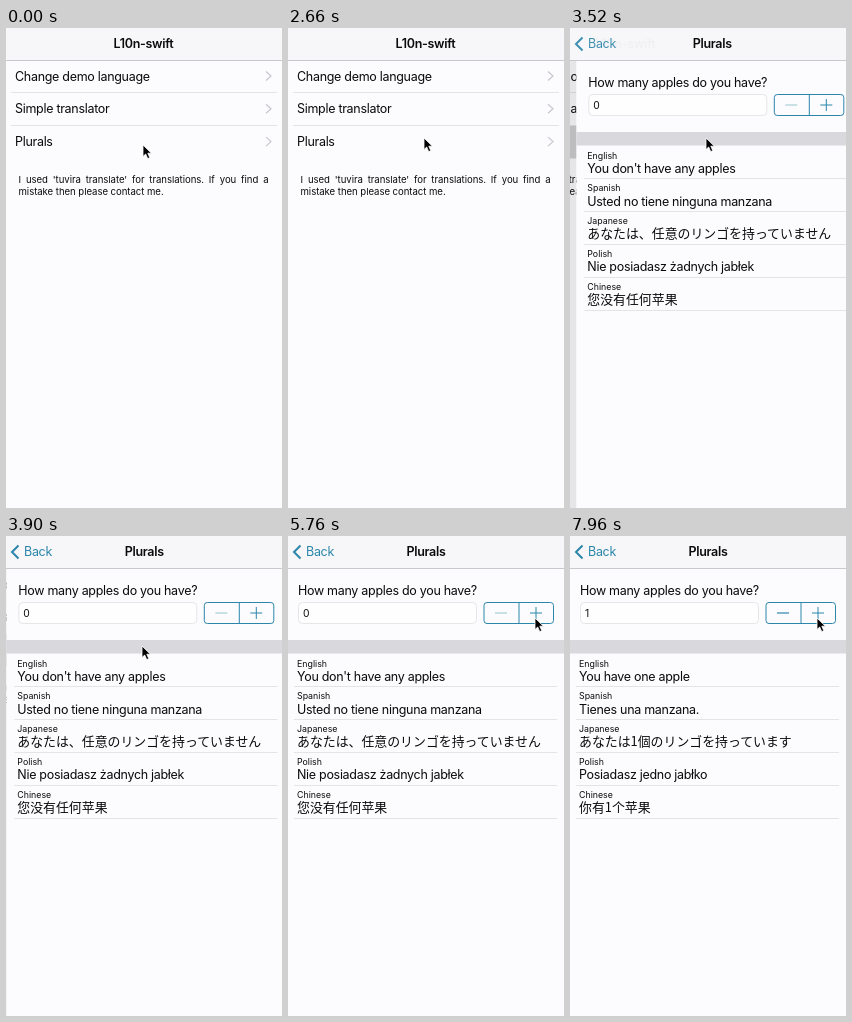
Recreate the animation shown at these times as an HTML page. Size 276 by 480 pixels, loop 8000 ms.

```html
<!DOCTYPE html>
<html lang="en">
<head>
<meta charset="utf-8">
<title>L10n-swift</title>
<style>
  html, body { margin: 0; width: 100%; height: 100%; overflow: hidden; background: #fcfcff; }
  svg { display: block; width: 276px; height: 480px; }
  text { font: 12.5px Inter, sans-serif; letter-spacing: -.3px; fill: #0b0b0b; white-space: pre; }
  .title { font-weight: 600; }
  .small { font-size: 8.8px; letter-spacing: 0; }
  .cjk { font-size: 12.9px; letter-spacing: 0; }
  .ja { font-family: "Noto Sans CJK JP", "Noto Sans CJK", sans-serif; }
  .zh { font-family: "Noto Sans CJK SC", "Noto Sans CJK", sans-serif; }
  .line { stroke: #e4e4e6; }
  .arrow { fill: none; stroke: #c7c7cc; stroke-width: 1.2; }
  .tint { fill: none; stroke: #2b86aa; }
  .note { font: 9.6px/12px Inter, sans-serif; letter-spacing: -.05px; color: #0b0b0b; }
  .note div { white-space: nowrap; }
  .note .full { white-space: normal; text-align-last: justify; }
</style>
</head>
<body>
<svg viewBox="0 0 276 480">
  <rect width="276" height="480" fill="#fcfcff"/>

  <g id="menu">
    <rect id="selected" y="97.5" width="276" height="33" fill="#cfcfd2"/>
    <g id="menuRows"></g>
    <foreignObject x="12.5" y="145.5" width="250" height="30">
      <div xmlns="http://www.w3.org/1999/xhtml" class="note">
        <div class="full">I used 'tuvira translate' for translations. If you find a</div>
        <div>mistake then please contact me.</div>
      </div>
    </foreignObject>
  </g>
  <rect id="dim" width="276" height="480"/>

  <g id="page">
    <rect width="276" height="480" fill="#fcfcff"/>
    <rect y="104" width="276" height="13.5" fill="#d9d9dd"/>
    <g id="content">
      <text x="10" y="59.2">How many apples do you have?</text>
      <rect x="10.5" y="66.5" width="178" height="21" rx="4" fill="#fefeff" stroke="#e6e6e8"/>
      <text id="count" x="15" y="80.8" style="font-size:10.3px;letter-spacing:0">0</text>
      <path id="plusFill" d="M231 66.5h31.5a3 3 0 0 1 3 3v15a3 3 0 0 1-3 3H231z" fill="#cde6ee"/>
      <rect class="tint" x="196" y="66.5" width="69.5" height="21" rx="3"/>
      <path class="tint" d="M231 66.5v21M242 77h12M248 71v12"/>
      <path id="minus" d="M207 77h12" stroke-width="1.2"/>
      <g id="phrases"></g>
    </g>
  </g>

  <rect width="276" height="32" fill="#f7f7f9"/>
  <path d="M0 32.5h276" stroke="#c9c9cd"/>
  <text id="menuTitle" class="title" x="107.5" y="20.3">L10n-swift</text>
  <text id="pageTitle" class="title" x="138" y="20.3" text-anchor="middle">Plurals</text>
  <g id="back">
    <path class="tint" d="M12.5 9.5L6 16l6.5 6.5" stroke-width="2"/>
    <text x="18" y="20.3" style="fill:#2b86aa">Back</text>
  </g>

  <g id="cursor">
    <circle id="ring" cx="1" r="16" fill="#fff" fill-opacity=".3" stroke="#111" stroke-width="1.5"/>
    <path d="M0 0v11.5l2.7-2.5 2 4.6 2.1-.9-2-4.5h3.6z" fill="#000" stroke="#fff" stroke-width=".8"/>
  </g>
</svg>
<script>
const $ = id => document.getElementById(id);
const LOOP = 8000, ROW = 32.8;
const PRESS_ROW = 2720, PUSH = 2890, SETTLE = 4250, PRESS_PLUS = 6900, RELEASE_PLUS = 7120;

const phrases = [
  ['English', '', "You don't have any apples", 'You have one apple'],
  ['Spanish', '', 'Usted no tiene ninguna manzana', 'Tienes una manzana.'],
  ['Japanese', 'cjk ja', 'あなたは、任意のリンゴを持っていません', 'あなたは1個のリンゴを持っています'],
  ['Polish', '', 'Nie posiadasz żadnych jabłek', 'Posiadasz jedno jabłko'],
  ['Chinese', 'cjk zh', '您没有任何苹果', '你有1个苹果'],
];

$('menuRows').innerHTML = ['Change demo language', 'Simple translator', 'Plurals'].map((label, i) => {
  const y = 48 + i * ROW;
  const line = i < 2 ? `<path class="line" d="M5 ${Math.round(y + 16) + .5}h266"/>` : '';
  return `<text x="9" y="${y + 4.5}">${label}</text>
    <path class="arrow" d="M260 ${y - 4.5}l5 4.5-5 4.5"/>${line}`;
}).join('');

$('phrases').innerHTML = phrases.map(([name, style], i) => {
  const y = 117.5 + i * ROW;
  return `<text class="small" x="9" y="${y + 13}">${name}</text>
    <text class="phrase ${style}" x="9" y="${y + 27.3}"></text>
    <path class="line" d="M6 ${Math.round(y + 32.8) + .5}h263"/>`;
}).join('');
const phraseNodes = document.querySelectorAll('.phrase');

const clamp = v => Math.min(1, Math.max(0, v));
const smooth = (t, from, to) => {
  const k = clamp((t - from) / (to - from));
  return k * k * (3 - 2 * k);
};
const move = (node, x, y = 0) => node.setAttribute('transform', `translate(${x} ${y})`);
const fade = (node, value) => node.setAttribute('opacity', value);
// Full while pressed, then a short fade
const press = (t, from, to) => t < from ? 0 : 1 - clamp((t - to) / 100);

let shownCount = -1;
function showCount(n) {
  if (n === shownCount) return;
  shownCount = n;
  $('count').textContent = n;
  phraseNodes.forEach((node, i) => node.textContent = phrases[i][2 + n]);
  $('minus').setAttribute('stroke', n ? '#2b86aa' : '#a8cfd2');
}

function draw(t) {
  // Critically damped spring for the page push
  const u = Math.max(0, t - PUSH) * .009;
  const rest = t >= SETTLE ? 0 : (1 + u) * Math.exp(-u);
  const done = 1 - rest;

  move($('menu'), -.3 * 276 * done);
  fade($('selected'), t >= PRESS_ROW + 40 ? 1 : 0);
  fade($('dim'), .09 * done);
  move($('page'), 276 * rest);
  move($('content'), t < SETTLE ? 2 : 0);

  move($('menuTitle'), -84 * done);
  fade($('menuTitle'), rest);
  move($('pageTitle'), 187 * rest);
  fade($('pageTitle'), clamp(done * 1.2));
  fade($('back'), clamp((done - .75) / .25));

  const settle = smooth(t, 200, 900), travel = smooth(t, 4450, 5200);
  move($('cursor'), 137 - settle + 111 * travel, 117 - 7 * settle - 28 * travel);
  const plus = press(t, PRESS_PLUS, RELEASE_PLUS);
  fade($('ring'), t < PUSH + 200 ? press(t, PRESS_ROW, PUSH - 20) : plus);
  fade($('plusFill'), plus);
  showCount(t >= RELEASE_PLUS ? 1 : 0);
}

const start = performance.now();
function tick() {
  draw((performance.now() - start) % LOOP);
  requestAnimationFrame(tick);
}
tick();
</script>
</body>
</html>
```
